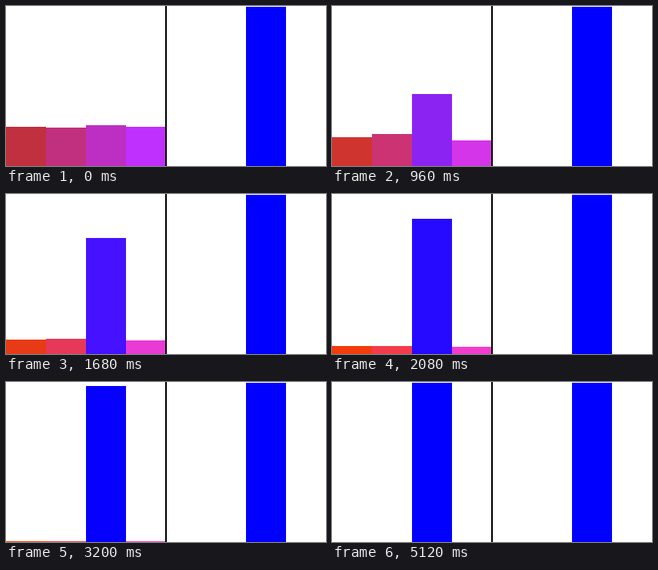
Write a matplotlib script that moves like this. It is 400 by 200 pixels and loops after 8 s.

```python
import numpy as np
import matplotlib.pyplot as plt
from matplotlib.animation import FuncAnimation
from matplotlib.patches import Rectangle

WIDTH, HEIGHT = 400, 200
BAR = 50
WINNER = 2
FRAMES, INTERVAL = 100, 80


def probabilities(step):
    """Four class probabilities, learning a one-hot answer."""
    learned = 1 - np.exp(-(step / 33) ** 2.31)
    logit = -1.047 + 0.041 * step + 3.9 * learned
    win = 1 / (1 + np.exp(-logit))
    # The losers split the rest, with a passing tilt between two of them.
    tilt = 0.046 * np.exp(-((step - 14.5) / 10) ** 2) - 0.009
    rest = 1 - win
    return rest / 3, rest * (1 / 3 + tilt), win, rest * (1 / 3 - tilt)


def bar_color(index, p):
    rgb = np.array([255 * (1 - p), 64 * (1 - p), 64 * index + 255 * p])
    return tuple(np.clip(np.floor(rgb), 0, 255) / 255)


def place_bar(bar, index, p):
    top = min(int(HEIGHT + 1 - HEIGHT * p), HEIGHT)
    bar.set_y(top)
    bar.set_height(HEIGHT - top)
    bar.set_visible(top < HEIGHT)
    bar.set_facecolor(bar_color(index, p))


def add_rect(x, width, height=0, color="white"):
    return ax.add_patch(Rectangle((x, 0), width, height, facecolor=color,
                                  linewidth=0, antialiased=False))


fig = plt.figure(figsize=(WIDTH / 100, HEIGHT / 100), dpi=100, facecolor="white")
ax = fig.add_axes([0, 0, 1, 1])
ax.set_xlim(0, WIDTH)
ax.set_ylim(HEIGHT, 0)
ax.axis("off")

bars = [add_rect(BAR * i, BAR) for i in range(4)]
answer = add_rect(WIDTH / 2 + BAR * WINNER, BAR)
place_bar(answer, WINNER, 1)
add_rect(WIDTH / 2 - 1, 2, HEIGHT, "black")


def update(frame):
    for i, p in enumerate(probabilities(frame)):
        place_bar(bars[i], i, p)
    return bars


anim = FuncAnimation(fig, update, frames=FRAMES, interval=INTERVAL,
                     repeat=True, repeat_delay=0)
plt.show()
```
